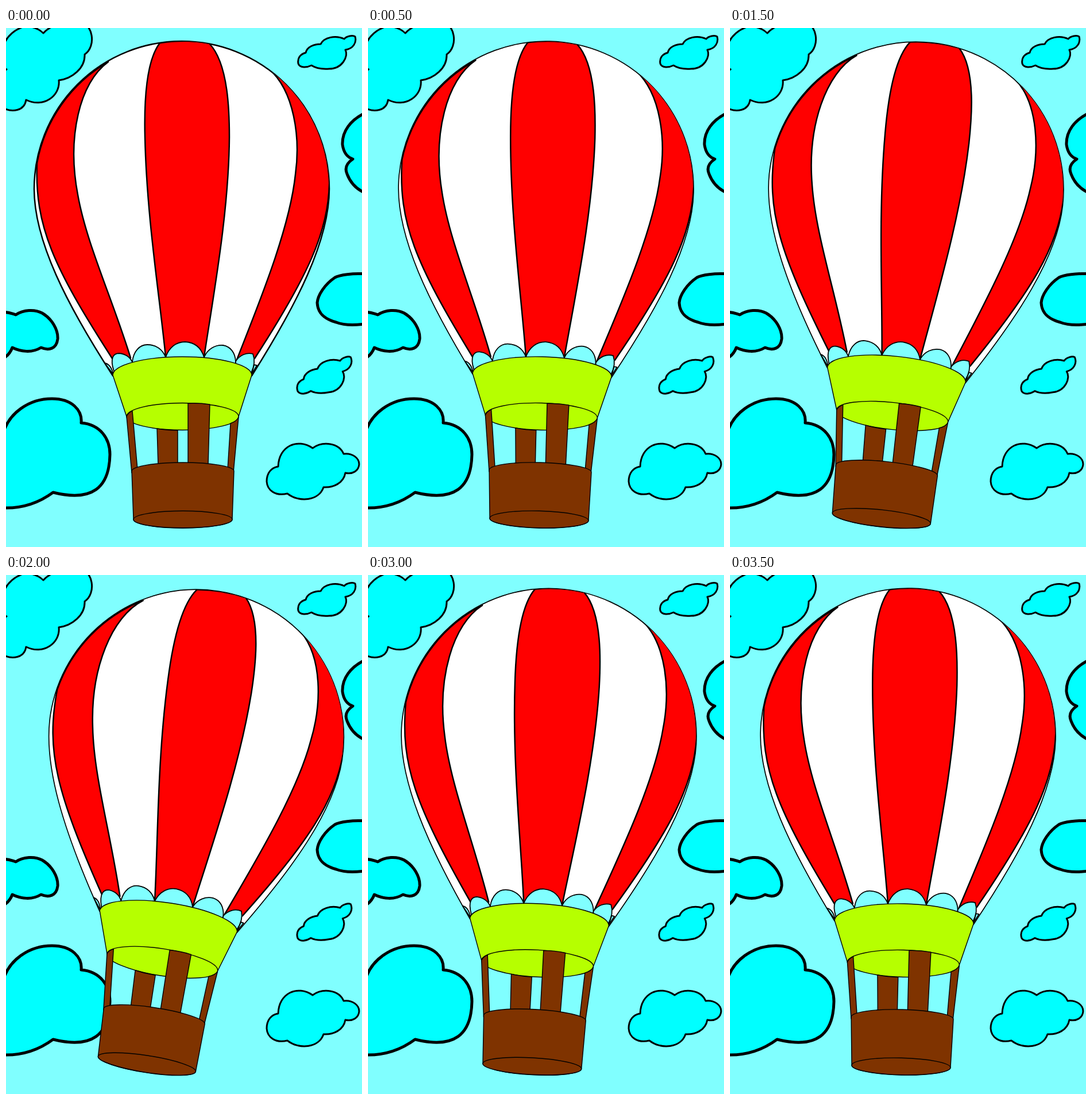
Recreate the animation shown at these times as an HTML page. Size 620x903 px, loop 4000 ms.

```html
<!DOCTYPE html>
<html lang="en">
<head>
<meta charset="utf-8">
<title>Hot-air balloon</title>
<style>
  html, body { margin: 0; width: 100%; height: 100%; overflow: hidden; background: #80ffff; }
  svg { display: block; width: 620px; height: 903px; }
  path, ellipse { stroke-linejoin: round; }
  .clouds { fill: #0ff; stroke: #000; }
  .envelope { stroke: #000; stroke-width: 2.5; }
  .scallops { fill: #80ffff; stroke: #000; stroke-width: 1.8; }
  .collar { fill: #b6ff00; stroke: #000; stroke-width: 1.4; }
  .basket { fill: #7f3300; stroke: #000; stroke-width: 1.4; }
</style>
</head>
<body>
<svg viewBox="0 0 620 903">
  <clipPath id="inside"><use href="#skin"/></clipPath>

  <g class="clouds">
    <g stroke-width="3">
      <path d="M-5 32C0 17 12 4 32-3C48-3 58 2 65 9C75-2 90-10 125-12C152-10 158 32 137 46C138 70 115 88 92 91C95 118 65 140 35 125C32 145 10 147-5 139"/>
      <path d="M-2 74L2 71"/>
      <path id="puff" d="M522 43C524 33 536 28 548 28C554 16 574 12 589 19C593 14 604 12 608 15C611 25 605 36 591 38C597 50 585 71 563 71C549 72 538 69 532 65C524 69 512 70 509 62C507 51 514 45 522 43Z"/>
      <use href="#puff" transform="translate(555 605.5) rotate(-7) translate(-559 -42)"/>
      <path d="M474 763C475 727 508 713 534 731C552 718 580 722 588 741C603 739 615 748 615 759C614 771 603 777 591 774C588 792 570 800 553 799C545 823 510 826 490 810C470 815 455 805 454 789C454 774 462 765 474 763Z"/>
    </g>
    <g stroke-width="5">
      <path d="M625 148C600 160 585 180 586 203C588 217 595 225 604 228C592 236 590 245 594 254C600 270 610 280 625 287"/>
      <path d="M625 428C605 426 580 430 573 434C555 446 543 465 542 478C543 500 560 508 575 512C590 518 610 517 625 515"/>
      <path d="M-5 494C5 495 10 496 17 499C30 490 50 489 63 496C80 506 91 525 90 541C88 558 75 562 61 556C45 566 25 563 11 556C8 564 4 570-5 575"/>
      <path d="M-5 705C5 670 40 645 80 645C115 645 133 665 131 687C165 690 181 715 181 742C180 800 150 825 82 808C55 828 25 836-5 835"/>
    </g>
  </g>

  <g id="balloon">
    <g class="envelope">
      <path id="skin" fill="#fff" d="M186 605C105 480 49 370 49 280A257 257 0 0 1 563 280C563 370 507 480 428 605Z"/>
      <g fill="#f00" clip-path="url(#inside)">
        <path d="M178 59A257 257 0 0 0 54 235C50 345 82 415 185 575L217 574C185 470 140 375 125 290C106 190 128 95 178 59Z"/>
        <path d="M268 26C240 62 241 150 242 190C245 330 268 470 278 572L345 572C362 460 388 320 389 190C389 150 388 62 354 27A257 257 0 0 0 268 26Z"/>
        <path d="M458 71A257 257 0 0 1 563 270C562 352 527 430 433 575L402 577C440 480 494 350 504 255C513 190 502 110 458 71Z"/>
      </g>
    </g>

    <g class="scallops">
      <path d="M172 583Q183 585 187 603Z"/>
      <path d="M188 597C180 573 188 566 197 566C208 567 216 573 220 581V600Z"/>
      <path d="M220 581C222 562 233 551 246 551C261 551 273 559 278 573V600H220Z"/>
      <path d="M278 573C284 555 297 546 312 546C328 547 340 556 345 573V600H278Z"/>
      <path d="M345 573C351 558 365 551 378 552C391 554 399 565 400 580V600H345Z"/>
      <path d="M400 580C407 569 419 564 430 567C434 578 432 590 427 600H400Z"/>
      <path d="M428 602L437 587L432 586Z"/>
    </g>

    <g class="collar">
      <path d="M186 604A121 32 0 0 1 428 604L405 676A98 24 0 0 1 210 676Z"/>
      <ellipse cx="307.5" cy="676" rx="97.5" ry="23.5"/>
    </g>

    <g class="basket">
      <path d="M263 697Q280 700 299 700V762H265Z"/>
      <path d="M317 653Q336 652 355 655L352 762H317Z"/>
      <path d="M210 676Q212 670 220 666L229 768L219 774Z"/>
      <path d="M405 677Q402 684 391 688L386 768L396 774Z"/>
      <path d="M219 771A89 15 0 0 1 397 771L394 855A86 15 0 0 1 222 855Z"/>
      <ellipse cx="308" cy="855" rx="86" ry="14.7"/>
    </g>
  </g>
</svg>
<script>
  const balloon = document.getElementById('balloon');
  const skin = document.getElementById('skin');
  const tilts = [0, 1.4, 3.1, 6.2, 8.8];

  // The balloon leans right in held steps, then returns the same way.
  function draw() {
    const step = Math.floor(performance.now() % 4000 / 500);
    const tilt = tilts[Math.min(step, 8 - step)];
    balloon.setAttribute('transform', `rotate(${tilt} 304 446)`);
    skin.style.strokeWidth = tilt ? 1.7 : 2.5;
    requestAnimationFrame(draw);
  }
  draw();
</script>
</body>
</html>
```
